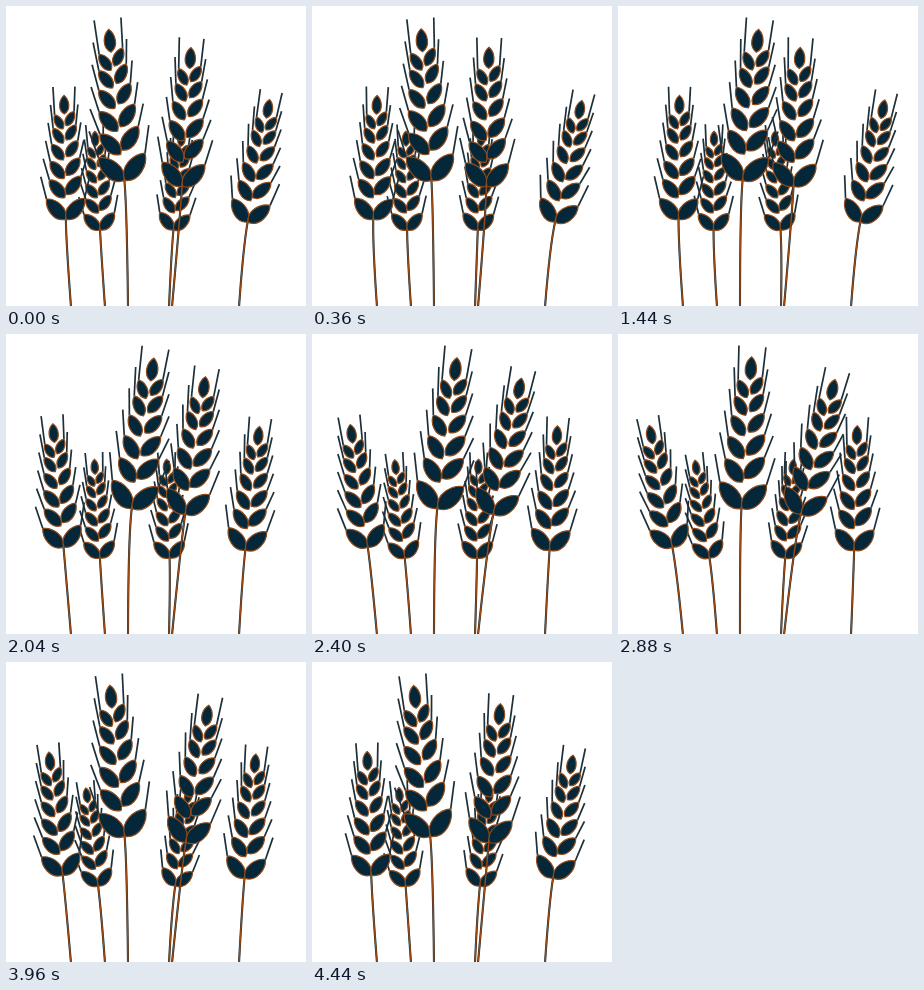
These frames come from a looping animation (300 px wide and 300 px high, 4560 ms). An HTML page:

```html
<!DOCTYPE html>
<html lang="en">
<head>
<meta charset="utf-8">
<title>Wheat in the wind</title>
<style>
  html, body { margin: 0; width: 100%; height: 100%; overflow: hidden; background: #fff; }
  svg { display: block; width: 100vw; height: 100vh; }
  .kernel { fill: #04283a; stroke: #8f4a1a; stroke-width: 1.2; vector-effect: non-scaling-stroke; }
  .bristle, .stem { fill: none; stroke: #1d2f38; stroke-width: 1.7; vector-effect: non-scaling-stroke; }
  .stem { stroke-width: 2.1; }
  .core { stroke: #9a4a12; stroke-width: 1.3; }
</style>
</head>
<body>
<svg id="stage" viewBox="0 0 300 300"></svg>
<script>
const LOOP = 4560, STEP = 120, RAD = Math.PI / 180;
const stage = document.getElementById('stage');

// Back to front: foot of the stem, mean base of the ear, size, sway in degrees.
const stalks = [
  { foot: 99,  x: 93.5,  y: 223, size: .65,  mean: -4,   amp: 5.2, shift: 2.5, peak: .22 },
  { foot: 163, x: 166,   y: 223, size: .65,  mean: 2.5,  amp: 6,   shift: 3.5, peak: .82 },
  { foot: 65,  x: 58,    y: 212, size: .815, mean: -4,   amp: 7,   shift: 4,   peak: .175 },
  { foot: 233, x: 240,   y: 215, size: .82,  mean: 7.4,  amp: 6.2, shift: 4,   peak: .175 },
  { foot: 166, x: 178.5, y: 179, size: .915, mean: 7.2,  amp: 7.3, shift: 4.8, peak: .67 },
  { foot: 122, x: 122,   y: 173, size: 1,    mean: 1,    amp: 7.4, shift: 4,   peak: .445 }
];

// Kernel pairs from the bottom up: height, distance from axis, length, angle.
const rows = [
  [11, 12, 34, 42], [36, 10.2, 29, 40], [59, 9.8, 27, 38],
  [81, 9, 24, 36], [101, 8, 22, 33], [118, 7, 20, 30]
];

function add(parent, tag, attrs) {
  const node = document.createElementNS('http://www.w3.org/2000/svg', tag);
  for (const key in attrs) node.setAttribute(key, attrs[key]);
  return parent.appendChild(node);
}

function addKernel(ear, x, height, length, angle) {
  add(ear, 'path', {
    class: 'kernel',
    d: 'M0-.5C.27-.28 .38.28 0 .5C-.38.28-.27-.28 0-.5Z',
    transform: `translate(${x} ${-height}) rotate(${angle}) scale(${length})`
  });
}

function buildEar(ear) {
  for (const side of [-1, 1]) {
    rows.forEach(([height, out, length, angle], i) => {
      const h = height + (side > 0 && i ? 4 : 0);
      const tipX = side * (out + length / 2 * Math.sin(angle * RAD));
      const tipY = h + length / 2 * Math.cos(angle * RAD);
      const endX = side * (30 - 3.3 * i);
      const endY = 51 + 22 * i;
      add(ear, 'path', { class: 'bristle', d: `M${tipX} ${-tipY}L${endX} ${-endY}` });
      addKernel(ear, side * out, h, length, side * angle);
    });
  }
  addKernel(ear, 0, 139, 23, 0);
}

for (const stalk of stalks) {
  stalk.stems = ['stem', 'stem core'].map(name => add(stage, 'path', { class: name }));
  stalk.ear = add(stage, 'g', {});
  buildEar(stalk.ear);
}

function draw(time) {
  const phase = Math.floor(time % LOOP / STEP) * STEP / LOOP;
  for (const s of stalks) {
    const wave = Math.cos(2 * Math.PI * (phase - s.peak));
    const tilt = s.mean + s.amp * wave;
    const x = s.x + s.shift * wave;
    const bendX = x - 25 * Math.sin(tilt * RAD);
    const bendY = s.y + 25 * Math.cos(tilt * RAD);
    const path = `M${x} ${s.y}Q${bendX} ${bendY} ${s.foot} 301`;
    s.stems.forEach(stem => stem.setAttribute('d', path));
    s.ear.setAttribute('transform', `translate(${x} ${s.y}) rotate(${tilt}) scale(${s.size})`);
  }
}

const start = performance.now();
function tick() {
  draw(performance.now() - start);
  requestAnimationFrame(tick);
}
tick();
</script>
</body>
</html>
```
